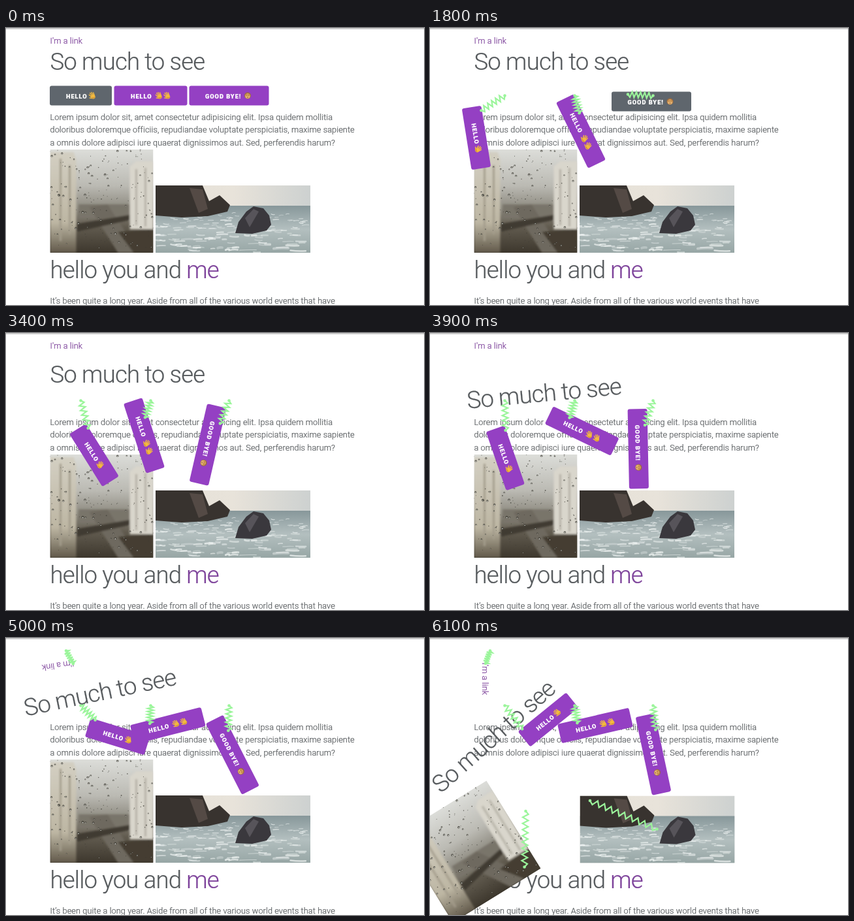
An HTML page for the animation above (6.2 s loop, 640 by 424 pixels).

```html
<!DOCTYPE html>
<html lang="en">
<head>
<meta charset="utf-8">
<title>Hanging page</title>
<style>
  html, body { margin: 0; width: 100%; height: 100%; overflow: hidden; background: #fff; }
  #stage { display: block; width: 640px; height: 424px; }
  text { font-family: Roboto, sans-serif; font-weight: 300; font-size: 12.64px; letter-spacing: .01em; fill: #565a5d; stroke: #565a5d; stroke-width: .22px; }
  .title { font-size: 36.5px; letter-spacing: -.8px; }
  .accent { fill: #7d429a; stroke: #7d429a; }
  .btn rect { fill: #9440c3; }
  .btn.hover rect { fill: #5f666d; }
  .btn text { font-weight: 900; font-size: 9.2px; letter-spacing: 1px; fill: #fff; stroke: #fff; }
  #springs path { fill: none; stroke: #9bf59b; stroke-width: 2.2; }
  #springs circle { fill: #9bf59b; }
</style>
</head>
<body>
<svg id="stage" viewBox="0 0 640 424">
  <defs>
    <linearGradient id="mist" x2="0" y2="1">
      <stop offset="0" stop-color="#dcddd9"/>
      <stop offset=".35" stop-color="#bbbab3"/>
      <stop offset=".55" stop-color="#918e84"/>
      <stop offset=".75" stop-color="#615b4f"/>
      <stop offset="1" stop-color="#3d372d"/>
    </linearGradient>
    <linearGradient id="tower" x2="0" y2="1">
      <stop offset="0" stop-color="#d3cfc2"/>
      <stop offset=".7" stop-color="#bdb6a3"/>
      <stop offset="1" stop-color="#61594a"/>
    </linearGradient>
    <linearGradient id="sky">
      <stop offset="0" stop-color="#e6e1d8"/>
      <stop offset=".5" stop-color="#e8e3da"/>
      <stop offset="1" stop-color="#cdd1d0"/>
    </linearGradient>
    <linearGradient id="sea" x2="0" y2="1">
      <stop offset="0" stop-color="#87979a"/>
      <stop offset=".5" stop-color="#b3bfbf"/>
      <stop offset="1" stop-color="#97a6a5"/>
    </linearGradient>
    <filter id="soft"><feGaussianBlur stdDeviation="1.6"/></filter>
    <filter id="fine"><feGaussianBlur stdDeviation=".6"/></filter>
    <g id="wave" transform="rotate(-30)">
      <path d="M-2 1L-3.4 -3.4M-.3 0L-.9 -5M1.5 0L1.5 -4.8M3 1L3.7 -3M-2 3.4L-5 1.2" stroke="#f3b93f" stroke-width="1.5" stroke-linecap="round"/>
      <ellipse cx=".5" cy="2" rx="3.2" ry="3.4" fill="#f3b93f"/>
      <path d="M-2 2.6Q0 5 2.6 4" fill="none" stroke="#b5762b" stroke-width=".7"/>
    </g>
    <g id="monkey">
      <circle r="5" fill="#9c6a3c"/>
      <circle cy=".6" r="3.9" fill="#e2b171"/>
      <circle cx="-1.7" cy="-.9" r="1.6" fill="#c48b4a"/>
      <circle cx="1.7" cy="-.9" r="1.6" fill="#c48b4a"/>
      <path d="M-1 2.6H1" stroke="#6b3f25" stroke-width=".7"/>
    </g>
  </defs>

  <rect width="640" height="424" fill="#fff"/>
  <rect y=".5" width="640" height="1" fill="#999"/>
  <text x="67.5" y="140.5">Lorem ipsum dolor sit, amet consectetur adipisicing elit. Ipsa quidem mollitia</text>
  <text x="67.5" y="160.1">doloribus doloremque officiis, repudiandae voluptate perspiciatis, maxime sapiente</text>
  <text x="67.5" y="179.7">a omnis dolore adipisci iure quaerat dignissimos aut. Sed, perferendis harum?</text>
  <text class="title" x="67.5" y="383.2">hello you and <tspan class="accent">me</tspan></text>
  <text x="67.5" y="422.2">It’s been quite a long year. Aside from all of the various world events that have</text>

  <g id="shore">
    <svg x="-118.5" y="-51.5" width="237" height="103" viewBox="0 0 237 103">
      <rect width="237" height="103" fill="url(#sky)"/>
      <rect y="31" width="237" height="72" fill="url(#sea)"/>
      <g id="foam" filter="url(#fine)" fill="none" stroke="#f0f4f3" stroke-linecap="round"/>
      <g filter="url(#fine)">
        <path d="M0 0H72L82 24L98 15L114 30L110 40L80 47L40 49L0 46Z" fill="#38332f"/>
        <path d="M52 4L72 6L80 36L66 42Z" fill="#544a45"/>
        <path d="M122 73L127 56L139 40L150 32L165 35L174 46L177 60L170 69L148 74Z" fill="#3a383d"/>
        <path d="M137 50L150 36L158 40L144 64Z" fill="#57545a"/>
      </g>
    </svg>
  </g>
  <g id="rain">
    <svg x="-79" y="-79" width="158" height="158" viewBox="0 0 158 158">
      <rect width="158" height="158" fill="url(#mist)"/>
      <g filter="url(#soft)">
        <path d="M44 84H122V104H44Z" fill="#79756a"/>
        <path d="M60 88L88 84L136 158H104Z" fill="#6e695e"/>
        <path d="M40 114L122 100V108L40 126Z" fill="#3f3a30"/>
        <path d="M0 4H36L40 16V158H0Z" fill="url(#tower)"/>
        <path d="M16 14V140M30 24V130" stroke="#a39c8b" stroke-width="3"/>
        <path d="M122 26L132 18H158V122H122Z" fill="#d9d6cc"/>
        <path d="M132 30V116M146 28V118" stroke="#b5b1a5" stroke-width="3"/>
        <path d="M104 126L158 122V158H128Z" fill="#443e33"/>
      </g>
      <g id="drops"/>
    </svg>
  </g>
  <g id="heading"><text class="title" x="-118.5" y="11.2">So much to see</text></g>
  <g id="link"><text class="accent" x="-24.5" y="4">I'm a link</text></g>
  <g id="hello" class="btn">
    <rect x="-47.5" y="-15" width="95" height="30" rx="3"/>
    <text x="-22.5" y="4">HELLO</text>
    <use href="#wave" x="17.5"/>
  </g>
  <g id="hello2" class="btn">
    <rect x="-56" y="-15" width="112" height="30" rx="3"/>
    <text x="-30.5" y="4">HELLO</text>
    <use href="#wave" x="12.5"/>
    <use href="#wave" x="25"/>
  </g>
  <g id="bye" class="btn">
    <rect x="-61" y="-15" width="122" height="30" rx="3"/>
    <text x="-36.5" y="4">GOOD BYE!</text>
    <use href="#monkey" x="28.5"/>
  </g>
  <g id="springs"/>
</svg>
<script>
const LOOP = 6200, STEP = 100;
const MOMENTS = [1800, 2600, 3400, 4400, 5500, 6100];
const $ = id => document.getElementById(id);

// home: resting centre; pin: spring grip relative to the centre; release: when it comes loose.
// poses: centre and angle at the last of MOMENTS, as many as are listed.
const bodies = [
  { id: 'hello', home: [114.5, 103.5], pin: [-40, -14], release: 300, hover: [0, 600],
    poses: [[71, 168, 81], [128.5, 186, 72], [135, 187, 58], [110, 190, 73], [198, 101, -33], [181, 125, -39]] },
  { id: 'hello2', home: [221.5, 103.5], pin: [-26, -10], release: 1000, hover: [700, 1300],
    poses: [[231, 158, 64], [214.5, 150, 108], [211.5, 157, 72], [245, 134, -13], [249.5, 138, -7], [253, 134, -13]] },
  { id: 'bye', home: [341.5, 103.5], pin: [-36, -11], release: 1600, hover: [1400, 2000],
    poses: [[339, 112.5, 0], [375, 160, 70], [309, 171, 103], [339, 179, 70], [349, 178.5, 63], [342, 178, 78]] },
  { id: 'heading', home: [186, 52.5], release: 3200,
    poses: [[186, 64.5, 0], [161.5, 111, -10.4], [127, 70, -16], [98, 151.5, -41.6]] },
  { id: 'link', home: [92, 19.5], pin: [-23, -1], release: 3900,
    poses: [[112, 53, 96], [65, 35, 201], [84, 62, 90]] },
  { id: 'rain', home: [146.5, 265], pin: [59, 64], release: 5000,
    poses: [[29.7, 271.5, -4], [60.8, 327, -31.7]] },
  { id: 'shore', home: [347.5, 292.5], pin: [-103, -44], release: 6050,
    poses: [[348, 293, 0]] }
];

function add(parent, tag, attrs = {}) {
  const el = document.createElementNS('http://www.w3.org/2000/svg', tag);
  for (const k in attrs) el.setAttribute(k, attrs[k]);
  return parent.appendChild(el);
}

function turn([x, y], deg) {
  const r = deg * Math.PI / 180, c = Math.cos(r), s = Math.sin(r);
  return [x * c - y * s, x * s + y * c];
}

const smooth = u => u * u * (3 - 2 * u);

// Smooth curve through unevenly spaced keys [t, x, y, angle].
function curve(keys, t) {
  const last = keys.length - 1;
  if (t <= keys[0][0]) return keys[0].slice(1);
  if (t >= keys[last][0]) return keys[last].slice(1);
  const slope = (n, c) => n === 0 || n === last ? 0 :
    (keys[n + 1][c] - keys[n - 1][c]) / (keys[n + 1][0] - keys[n - 1][0]);
  const i = keys.findIndex(k => k[0] > t) - 1;
  const a = keys[i], b = keys[i + 1], d = b[0] - a[0], u = (t - a[0]) / d;
  return [1, 2, 3].map(c => a[c] + (b[c] - a[c]) * smooth(u)
    + d * u * (1 - u) * ((1 - u) * slope(i, c) - u * slope(i + 1, c)));
}

// A freed button swings about its hanging pose, then settles into the curve.
function swing(b, t) {
  const [first, next] = b.keys, age = t - first[0];
  if (age <= 0 || t >= next[0]) return curve(b.keys, t);
  const hang = [b.home[0], b.home[1] + 40, 90];
  const left = Math.exp(-age / 500) * Math.cos(age * 2 * Math.PI / 1000);
  const mix = smooth(age / (next[0] - first[0]));
  return hang.map((h, c) => {
    const v = h + (first[c + 1] - h) * left;
    return v + (next[c + 1] - v) * mix;
  });
}

function coil([x1, y1], [x2, y2]) {
  const dx = x2 - x1, dy = y2 - y1, len = Math.hypot(dx, dy) || 1;
  const n = Math.ceil(Math.min(20, Math.max(12, len / 5)));
  let d = `M${x1} ${y1}`;
  for (let j = 1; j < n; j++) {
    const side = j % 2 ? -4.3 : 4.3;
    d += `L${x1 + dx * j / n - dy / len * side} ${y1 + dy * j / n + dx / len * side}`;
  }
  return d + `L${x2} ${y2}`;
}

function paintPhotos() {
  let seed = 11;
  const rnd = () => (seed = seed * 16807 % 2147483647) / 2147483647;
  for (let i = 0; i < 190; i++) {
    const cx = rnd() * 158, cy = rnd() * 150, r = .5 + 1.6 * rnd() ** 3;
    add($('drops'), 'circle', { cx, cy, r, fill: '#3b3933', opacity: .7 });
    if (r > 1) add($('drops'), 'circle', { cx, cy: cy + r * .4, r: r * .4, fill: '#e6e6e0' });
  }
  for (let i = 0; i < 150; i++) {
    const depth = rnd(), w = 5 + 22 * depth * rnd(), h = 2 - 4 * rnd();
    add($('foam'), 'path', {
      d: `M${rnd() * 237 - 10} ${42 + 60 * depth}q${w / 2} ${h} ${w} ${h / 2}`,
      'stroke-width': 1 + 3 * depth * rnd(), opacity: .3 + .5 * rnd()
    });
  }
}

function setup(b) {
  const pin = b.pin || [0, 0];
  const key = (t, [x, y, deg]) => {
    const [px, py] = turn(pin, deg);
    return [t, x + px, y + py, deg];
  };
  const times = MOMENTS.slice(-b.poses.length);
  b.keys = [key(b.release, [...b.home, 0]), ...b.poses.map((p, i) => key(times[i], p))];
  b.el = $(b.id);
  if (!b.pin) return;
  b.spring = add($('springs'), 'g');
  b.wire = add(b.spring, 'path');
  add(b.spring, 'circle', { cx: b.home[0], cy: b.home[1], r: 2.3 });
  b.grip = add(b.spring, 'circle', { r: 2.3 });
}

function place(b, t) {
  const [px, py, deg] = b.hover ? swing(b, t) : curve(b.keys, t);
  const [ox, oy] = turn(b.pin || [0, 0], deg);
  b.el.setAttribute('transform', `translate(${px - ox} ${py - oy}) rotate(${deg})`);
  if (b.hover) b.el.classList.toggle('hover', t >= b.hover[0] && t < b.hover[1]);
  if (!b.spring) return;
  b.spring.setAttribute('display', t > b.release ? 'inline' : 'none');
  b.wire.setAttribute('d', coil(b.home, [px, py]));
  b.grip.setAttribute('cx', px);
  b.grip.setAttribute('cy', py);
}

paintPhotos();
bodies.forEach(setup);
const start = performance.now();
function draw() {
  const t = Math.floor((performance.now() - start) % LOOP / STEP) * STEP;
  bodies.forEach(b => place(b, t));
  requestAnimationFrame(draw);
}
draw();
</script>
</body>
</html>
```
